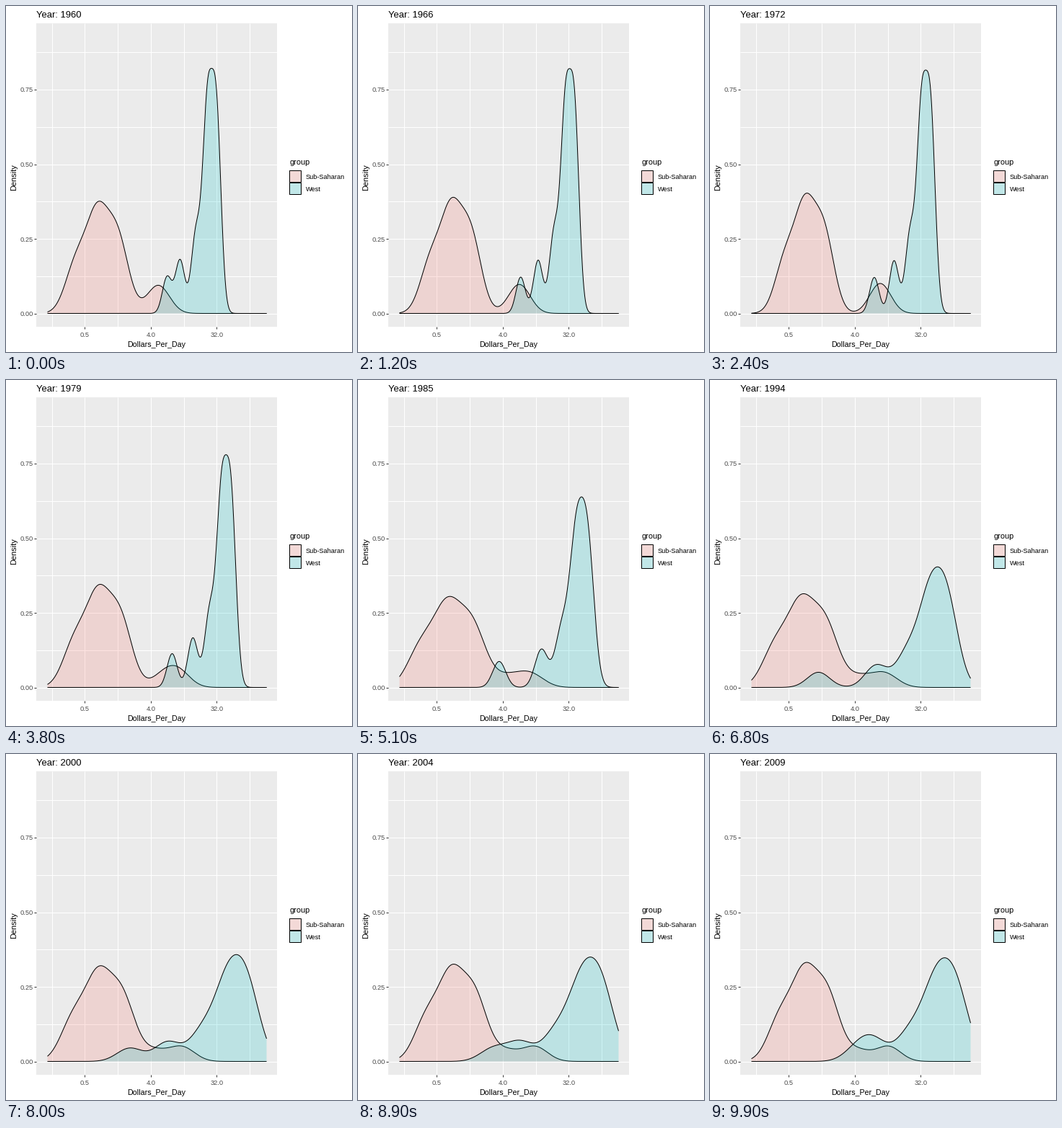
A matplotlib script for the animation above (10000 ms loop, 480 by 480 pixels).

```python
import numpy as np
import matplotlib.pyplot as plt
from matplotlib.animation import FuncAnimation
from matplotlib.patches import Rectangle

plt.rcParams["font.family"] = "Liberation Sans"

SIZE, FRAMES, STEP_MS = 480, 100, 100
LEFT, RIGHT, TOP, BOTTOM = 42, 376, 24, 445
BASE, UNIT = 426, 414.7            # zero line and pixels per unit of density
DOUBLING = 30.5                    # pixels per doubling of income
RED, BLUE = "#F8766D", "#00BFC4"
KEYS = [0, 2.4, 5.1, 9.9]          # seconds
X = np.linspace(57, 361, 609)


def kernel_sum(centres, shares, width):
    """Kernel density estimate in pixels, with unit area on the log axis."""
    z = (X[:, None] - np.array(centres)) / width
    peak = UNIT * DOUBLING / (width * np.sqrt(2 * np.pi))
    return peak * np.exp(-z * z / 2) @ np.array(shares)


def sub_saharan(t):
    """A three-part main hump plus two richer clusters that drift."""
    mid, width, near, far = (np.interp(t, KEYS, v) for v in (
        [126, 131, 123, 130], [15, 14, 18.5, 17],
        [206, 231, 205, 205], [214, 239, 238, 247]))
    hump = mid + width * np.array([-1.95, 0, 1.9])
    return kernel_sum([*hump, near, far], [0.20, 0.38, 0.30, 0.05, 0.07], width)


def west(t):
    """Steady growth; the group fans out when its poorest member collapses."""
    spread = 1 / (1 + np.exp((6 - t) / 0.7))
    mid = 285 + 41 * (t / KEYS[-1]) ** 0.75
    rich = mid + (1 + 1.25 * spread) * np.array([-44, -22, -6.3, 6.3])
    poorest = np.interp(t, [0, 3.8, 6.8, 9.9], [223, 230, 150, 205])
    return kernel_sum([poorest, *rich], [0.065, 0.095, 0.14, 0.35, 0.35],
                      6.5 + 12 * spread)


fig = plt.figure(figsize=(SIZE / 72, SIZE / 72), dpi=72, facecolor="white")
ax = fig.add_axes([0, 0, 1, 1])
ax.set_xlim(0, SIZE)
ax.set_ylim(SIZE - 1, -1)          # whole numbers snap to pixel rows
ax.axis("off")


def rect(x0, y0, x1, y1, z=0, **style):
    ax.add_patch(Rectangle((x0, y0), x1 - x0, y1 - y0, zorder=z, **style))


def line(xs, ys, color, z=1):
    return ax.plot(xs, ys, color=color, lw=1, zorder=z,
                   solid_capstyle="butt")[0]


def text(x, y, s, size, color="black", **kw):
    return ax.text(x, y, s, fontsize=size, color=color, zorder=9, **kw)


# Panel, grid and axes
rect(LEFT, TOP - 1, RIGHT, BOTTOM - 1, color="#EBEBEB", lw=0)
for i in range(8):
    y = BASE - UNIT * i / 8
    line([LEFT, RIGHT], [y, y], "white")
    if i % 2 == 0:
        line([LEFT - 3, LEFT], [y, y], "#333333")
        text(37.5, y + 3.4, f"{i / 8:.2f}", 9.2, "#4D4D4D", ha="right")
for i in range(7):
    x = 63.6 + 1.5 * DOUBLING * i
    line([x, x], [TOP - 1, BOTTOM - 1], "white")
    if i % 2:
        line([x, x], [BOTTOM - 1, BOTTOM + 2], "#333333")
        text(x, 458, f"{0.5 * 8 ** (i // 2):.1f}", 9.2, "#4D4D4D", ha="center")
text(209, 472, "Dollars_Per_Day", 10.6, ha="center")
text(16.5, 236.5, "Density", 11, rotation=90, ha="right", va="center")

# Legend
text(393, 219, "group", 11)
for y, color, label in [(227, RED, "Sub-Saharan"), (244, BLUE, "West")]:
    rect(393, y, 409, y + 16, 2, fc="#F2F2F2", lw=0)
    rect(393, y, 409, y + 16, 3, fc=color, alpha=0.2, lw=0)
    rect(393, y, 409, y + 16, 4, fc="none", ec="black", lw=1)
    text(416, y + 12, label, 9.1)

# Moving parts
title = text(42, 15.5, "", 13)
curves = []
for z, density, color in [(4, sub_saharan, RED), (6, west, BLUE)]:
    area, = ax.fill([0], [0], fc=color, alpha=0.2, lw=0, zorder=z)
    curves.append((density, area, line([], [], "black", z + 1)))


def draw(i):
    title.set_text(f"Year: {1960 + round(49 * i / (FRAMES - 1))}")
    xs, floor = X + 0.5, BASE - 0.5
    for density, area, edge in curves:
        ys = floor - density(i * STEP_MS / 1000)
        edge.set_data(xs, ys)
        area.set_xy(np.column_stack([np.r_[xs, xs[-1], xs[0]],
                                     np.r_[ys, floor, floor]]))
    return [title]


anim = FuncAnimation(fig, draw, frames=FRAMES, interval=STEP_MS,
                     repeat=True, repeat_delay=0)
plt.show()
```
